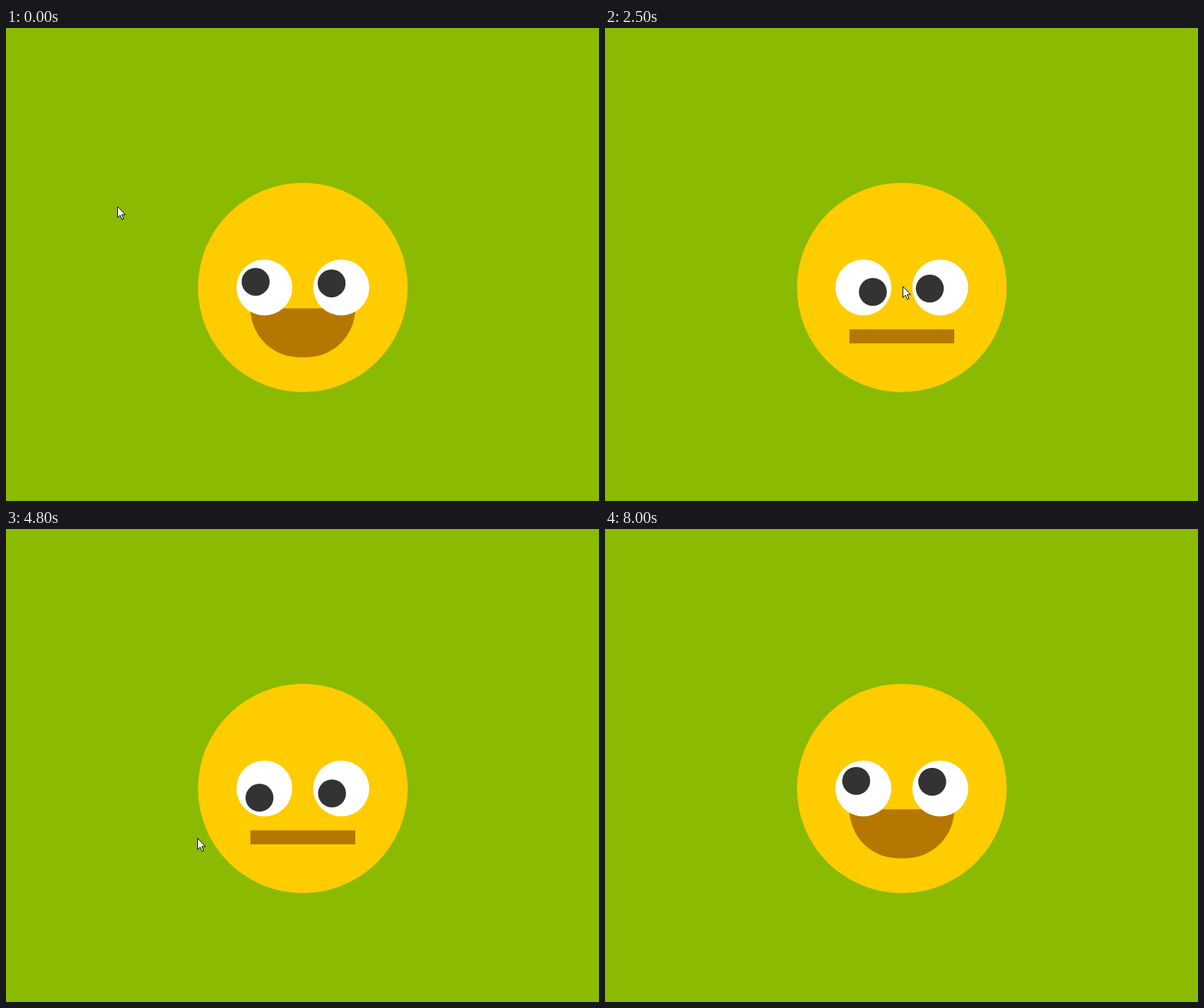
Recreate the animation shown at these times as an HTML page. Size 837x669 px, loop 8500 ms.

```html
<!DOCTYPE html>
<html lang="en">
<head>
<meta charset="utf-8">
<title>Watching face</title>
<style>
  html, body { margin: 0; width: 100%; height: 100%; overflow: hidden; background: #8aba02; }
  svg { display: block; width: 837px; height: 669px; }
</style>
</head>
<body>
<svg viewBox="0 0 837 669">
  <rect width="837" height="669" fill="#8aba02"/>
  <circle cx="419" cy="367" r="148" fill="#ffcc00"/>
  <path id="mouth" fill="#b57700"/>
  <g fill="#fff">
    <circle cx="364.7" cy="367" r="39.5"/>
    <circle cx="473.2" cy="367" r="39.5"/>
  </g>
  <g fill="#333">
    <circle class="pupil" r="19.75"/>
    <circle class="pupil" r="19.75"/>
  </g>
  <path id="cursor" d="M.5 .5V16.3L4.1 12.9L6.7 18.9L9.1 17.8L6.5 12H11.3Z"
    fill="#fff" stroke="#000" stroke-linejoin="round"/>
</svg>
<script>
const LOOP = 8500, STEP = 100;
const LOOK_LAG = 100, HOVER_LAG = 60, FADE = 200;
const FACE = { x: 419, y: 367, r: 148 };
const EYES = [364.7, 473.2], REACH = 14.8;

// Turning points of the cursor: time, x, y
const path = [
  [-100, 157, 231], [0, 157, 252], [900, 430, 360], [1300, 529, 425], [1600, 287, 585],
  [1700, 221, 545], [1900, 163, 446], [2500, 420, 365], [3200, 545, 292], [3300, 620, 285],
  [3400, 672, 238], [3600, 569, 224], [4200, 430, 360], [4700, 322, 448], [4800, 270, 437],
  [5100, 198, 385], [5460, 325, 226], [5500, 386, 301], [5600, 378, 310], [6200, 430, 372],
  [6740, 567, 367], [6800, 650, 368], [6900, 703, 409], [7000, 495, 473], [7300, 272, 372],
  [7400, 17, 260], [7900, -36, -60]
];

const mouth = document.getElementById("mouth");
const cursor = document.getElementById("cursor");
const pupils = document.querySelectorAll(".pupil");

// Smooth curve through the turning points
function cursorAt(t) {
  const last = path.length - 1;
  t = Math.min(Math.max(t, path[0][0]), path[last][0]);
  const i = Math.max(1, path.findIndex(p => p[0] >= t));
  const a = path[i - 1], b = path[i];
  const before = path[Math.max(i - 2, 0)], after = path[Math.min(i + 1, last)];
  const span = b[0] - a[0], u = (t - a[0]) / span, v = 1 - u;
  return [1, 2].map(k => {
    const m0 = (b[k] - before[k]) / (b[0] - before[0]) * span;
    const m1 = (after[k] - a[k]) / (after[0] - a[0]) * span;
    return v * v * ((1 + 2 * u) * a[k] + u * m0) + u * u * ((1 + 2 * v) * b[k] - v * m1);
  });
}

function overFace(t) {
  const [x, y] = cursorAt(t);
  return Math.hypot(x - FACE.x, y - FACE.y) < FACE.r;
}

// Times at which the mouth starts to close or open
const toggles = [];
for (let t = 1; t < LOOP; t++) {
  if (overFace(t) !== overFace(t - 1)) toggles.push({ start: t + HOVER_LAG, goal: overFace(t) ? 0 : 1 });
}

// Cubic Bezier (.25, .1, .25, 1)
function ease(x) {
  if (x <= 0 || x >= 1) return x <= 0 ? 0 : 1;
  const curve = (u, a, b) => 3 * a * u * (1 - u) ** 2 + 3 * b * u * u * (1 - u) + u ** 3;
  let lo = 0, hi = 1;
  for (let i = 0; i < 24; i++) {
    const mid = (lo + hi) / 2;
    if (curve(mid, .25, .25) < x) lo = mid; else hi = mid;
  }
  return curve(lo, .1, 1);
}

function openness(t) {
  return toggles.reduce((p, { start, goal }) => p + (goal - p) * ease((t - start) / FADE), 1);
}

function drawMouth(p) {
  const left = FACE.x - 74, right = FACE.x + 74, r = 69 * p;
  const top = 426.2 - 29.6 * p, bottom = 445.9 + 19.75 * p;
  mouth.setAttribute("d", `M${left} ${top}H${right}V${bottom - r}A${r} ${r} 0 0 1 ${right - r} ${bottom}` +
    `H${left + r}A${r} ${r} 0 0 1 ${left} ${bottom - r}Z`);
}

function draw(time) {
  const t = Math.floor(time % LOOP / STEP) * STEP;
  const [x, y] = cursorAt(t), [lookX, lookY] = cursorAt(t - LOOK_LAG);
  cursor.setAttribute("transform", `translate(${Math.round(x)} ${Math.round(y)})`);
  pupils.forEach((pupil, i) => {
    const angle = Math.atan2(lookY - FACE.y, lookX - EYES[i]);
    pupil.setAttribute("cx", EYES[i] + REACH * Math.cos(angle));
    pupil.setAttribute("cy", FACE.y + REACH * Math.sin(angle));
  });
  drawMouth(openness(t));
}

let begin;
function tick(now) {
  begin ??= now;
  draw(now - begin);
  requestAnimationFrame(tick);
}
draw(0);
requestAnimationFrame(tick);
</script>
</body>
</html>
```
